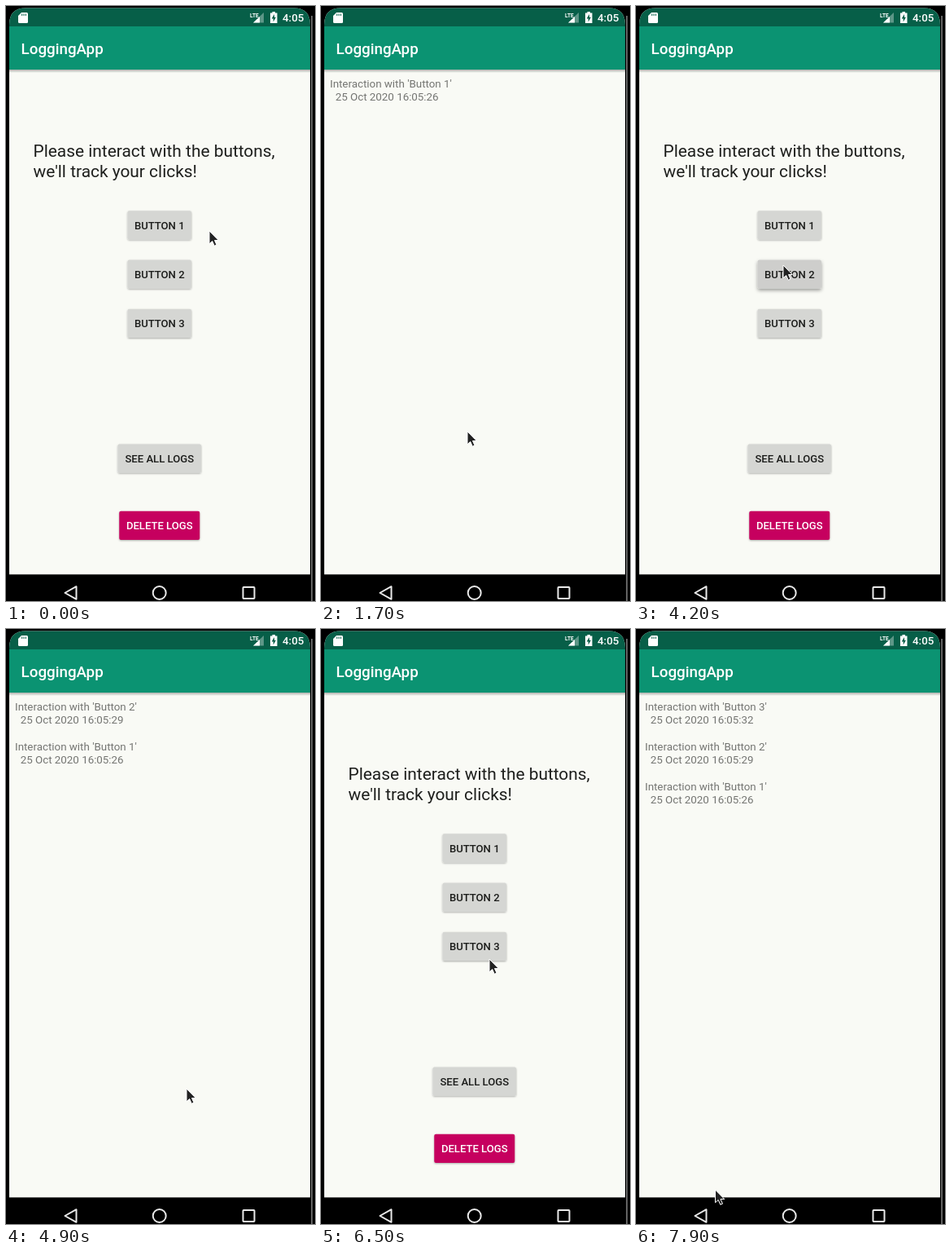
An HTML page that plays this animation: 380 by 730 pixels, repeating every 8000 ms.

```html
<!DOCTYPE html>
<html lang="en">
<head>
<meta charset="utf-8">
<title>Click log demo</title>
<style>
  html, body { margin: 0; width: 100%; height: 100%; overflow: hidden; background: #000; }
  svg { display: block; width: 380px; height: 730px; font-family: Roboto, sans-serif; }
  .btn { font-size: 13.1px; font-weight: 500; text-anchor: middle; }
  .log { font-size: 13.35px; fill: #747572; }
</style>
</head>
<body>
<svg viewBox="0 0 380 730">
  <defs>
    <filter id="low" x="-20%" y="-30%" width="140%" height="170%">
      <feDropShadow dx="0" dy="1" stdDeviation="0.9" flood-opacity=".32"/>
    </filter>
    <filter id="high" x="-20%" y="-40%" width="140%" height="200%">
      <feDropShadow dx="0" dy="2.2" stdDeviation="2.2" flood-opacity=".38"/>
    </filter>
    <linearGradient id="fall" x2="0" y2="1">
      <stop stop-color="#000" stop-opacity=".3"/>
      <stop offset="1" stop-color="#000" stop-opacity="0"/>
    </linearGradient>
    <clipPath id="screen"><path d="M4 698V23Q4 2.500 24 2.500H354Q374 2.500 374 23V698Z"/></clipPath>
  </defs>

  <rect width="380" height="730" fill="#000"/>
  <rect x="375.200" y="12" width="1.800" height="718" fill="#6e6e6e"/>
  <g clip-path="url(#screen)">
    <rect width="380" height="730" fill="#f9faf5"/>
    <rect width="380" height="25" fill="#075f48"/>
    <rect y="25" width="380" height="53" fill="#0b9372"/>
    <rect y="78" width="380" height="4" fill="url(#fall)"/>
  </g>

  <g fill="#fff">
    <path d="M19 8H25.500Q27 8 27 9.500V19.500Q27 21 25.500 21H16.500Q15 21 15 19.500V12Z"/>
    <path d="M19.700 9.500v2.500M22 9.500v2.500M24.300 9.500v2.500" stroke="#075f48"/>
    <text x="300" y="13.500" font-size="6.600" font-weight="700">LTE</text>
    <path d="M317 8V20.500H304Z" opacity=".35"/>
    <path d="M312 13V20.500H304Z"/>
    <path d="M327.500 7H331V8.500H333.500V21H325V8.500H327.500Z"/>
    <path d="M330 10 326.700 15.500H328.700V19.500L332 13.700H330Z" fill="#075f48"/>
    <text x="340" y="19.200" font-size="13.400" font-weight="500">4:05</text>
    <text x="18.600" y="59" font-size="18.750" font-weight="500">LoggingApp</text>
  </g>

  <g id="home">
    <g font-size="20.900" fill="#1e1f1d">
      <text x="33.500" y="185.300">Please interact with the buttons,</text>
      <text x="33.500" y="210.300">we'll track your clicks!</text>
    </g>
  </g>
  <g id="list"></g>

  <rect y="697.400" width="374" height="33" fill="#000"/>
  <rect id="halo" x="34" y="697.500" width="90" height="45" rx="22" fill="#2c2c2c"/>
  <g fill="none" stroke="#e9e9e9" stroke-width="2" stroke-linejoin="round">
    <path d="M72.500 720 86.500 712.200V727.800Z"/>
    <circle cx="188.700" cy="720" r="8"/>
    <rect x="291.500" y="713" width="14" height="14" rx=".8"/>
  </g>
  <path id="cursor" d="M0 0V15.800L3.700 12.500 6.300 18.300 9 17.100 6.500 11.500H11.300Z"
        fill="#222" stroke="#fff"/>
</svg>
<script>
const STEP = 100, FADE = 300, OPEN_DELAY = 300, CLOSE_DELAY = 100;
const SEE = 3, BACK = 'back', backSpot = [86.5, 710.5];
const $ = id => document.getElementById(id);

function add(parent, tag, attrs, text) {
  const el = document.createElementNS('http://www.w3.org/2000/svg', tag);
  set(el, attrs);
  if (text) el.textContent = text;
  parent.appendChild(el);
  return el;
}

function set(el, attrs) {
  for (const k in attrs) el.setAttribute(k, attrs[k]);
}

function makeButton(label, y, width, fill = '#d5d6d3', ink = '#1c1d1b') {
  const mid = 188.75, id = 'clip' + y;
  const box = { x: mid - width / 2, y, width, height: 35.3, rx: 2 };
  add(add($('home'), 'clipPath', { id }), 'rect', box);
  const face = add($('home'), 'rect', { ...box, fill, filter: 'url(#low)' });
  const wave = add($('home'), 'circle', { 'clip-path': `url(#${id})` });
  add($('home'), 'text', { class: 'btn', x: mid, y: y + 22.4, fill: ink }, label);
  return { face, wave };
}

const buttons = [1, 2, 3].map(n => makeButton('BUTTON ' + n, 191 + 60.25 * n, 78.5));
buttons.push(makeButton('SEE ALL LOGS', 537.5, 102.5));
makeButton('DELETE LOGS', 619.8, 99, '#c6005e', '#fff');

// Three entries of two lines; the newest goes first
const line = (x, y) => add($('list'), 'text', { class: 'log', x, y });
const rows = [0, 1, 2].map(i => [line(11, 100 + 49 * i), line(17.7, 116 + 49 * i)]);

// The session, told as hand movements; the clock runs along
let clock = 0, spot = [250, 276];
const moves = [], taps = [], screens = [{ at: 0, entries: 0 }];
let logged = 0;

function wait(ms) { clock += ms; }

function move(ms, x, y) {
  moves.push({ at: clock, ms, from: spot, to: [x, y] });
  spot = [x, y];
  clock += ms;
}

function click(target, raised) {
  taps.push({ target, raised, at: clock, spot });
  if (target === BACK) screens.push({ at: clock + CLOSE_DELAY, entries: 0 });
  else if (target === SEE) screens.push({ at: clock + OPEN_DELAY, entries: logged });
  else logged++;
}

move(400, 207, 275); wait(200); click(0);
move(300, 243, 506); wait(100);
move(300, 180, 549); wait(100); click(SEE, true); wait(200);
move(100, 180, 522);
move(100, 180, 508); wait(200);
move(400, 52, 42); wait(100);
move(100, 46, 16); wait(100);
move(200, 101, 681); wait(100);
move(300, ...backSpot); wait(200); click(BACK);

move(300, 181, 318); wait(200); click(1, true); wait(200);
move(200, 222, 564); wait(200); click(SEE, true); wait(300);
move(700, ...backSpot); wait(300); click(BACK); wait(100);

move(500, 207, 405); wait(300); click(2); wait(300);
move(300, 197, 551); click(SEE, true); wait(400);
move(100, 97.5, 688); wait(100);
const LOOP = clock;

const latest = (events, t) => events.filter(e => e.at <= t).pop();

function pointerAt(t) {
  const { at, ms, from, to } = latest(moves, t);
  const u = Math.min(1, (t - at) / ms);
  return from.map((a, i) => a + (to[i] - a) * u);
}

// Fraction of a tap's fade that has passed, with the tap itself
function tapOn(target, t) {
  const tap = latest(taps.filter(p => p.target === target), t);
  return { tap, u: tap ? Math.min(1, (t - tap.at) / FADE) : 1 };
}

function draw(time) {
  const t = Math.floor(time % LOOP / STEP) * STEP;
  const { entries } = latest(screens, t);
  $('home').style.display = entries ? 'none' : '';
  $('list').style.display = entries ? '' : 'none';

  rows.forEach(([head, date], i) => {
    const n = entries - i;
    head.textContent = n > 0 ? `Interaction with 'Button ${n}'` : '';
    date.textContent = n > 0 ? `25 Oct 2020 16:05:${23 + 3 * n}` : '';
  });

  buttons.forEach(({ face, wave }, i) => {
    const { tap, u } = tapOn(i, t);
    set(face, { filter: u < 1 && tap.raised ? 'url(#high)' : 'url(#low)' });
    set(wave, { opacity: 0.1 * (1 - u) });
    if (tap) set(wave, { cx: tap.spot[0], cy: tap.spot[1], r: 45 + 50 * u });
  });

  set($('halo'), { opacity: 1 - tapOn(BACK, t).u });
  set($('cursor'), { transform: `translate(${pointerAt(t)})` });
}

const start = performance.now();
function tick() {
  draw(performance.now() - start);
  requestAnimationFrame(tick);
}
tick();
</script>
</body>
</html>
```
